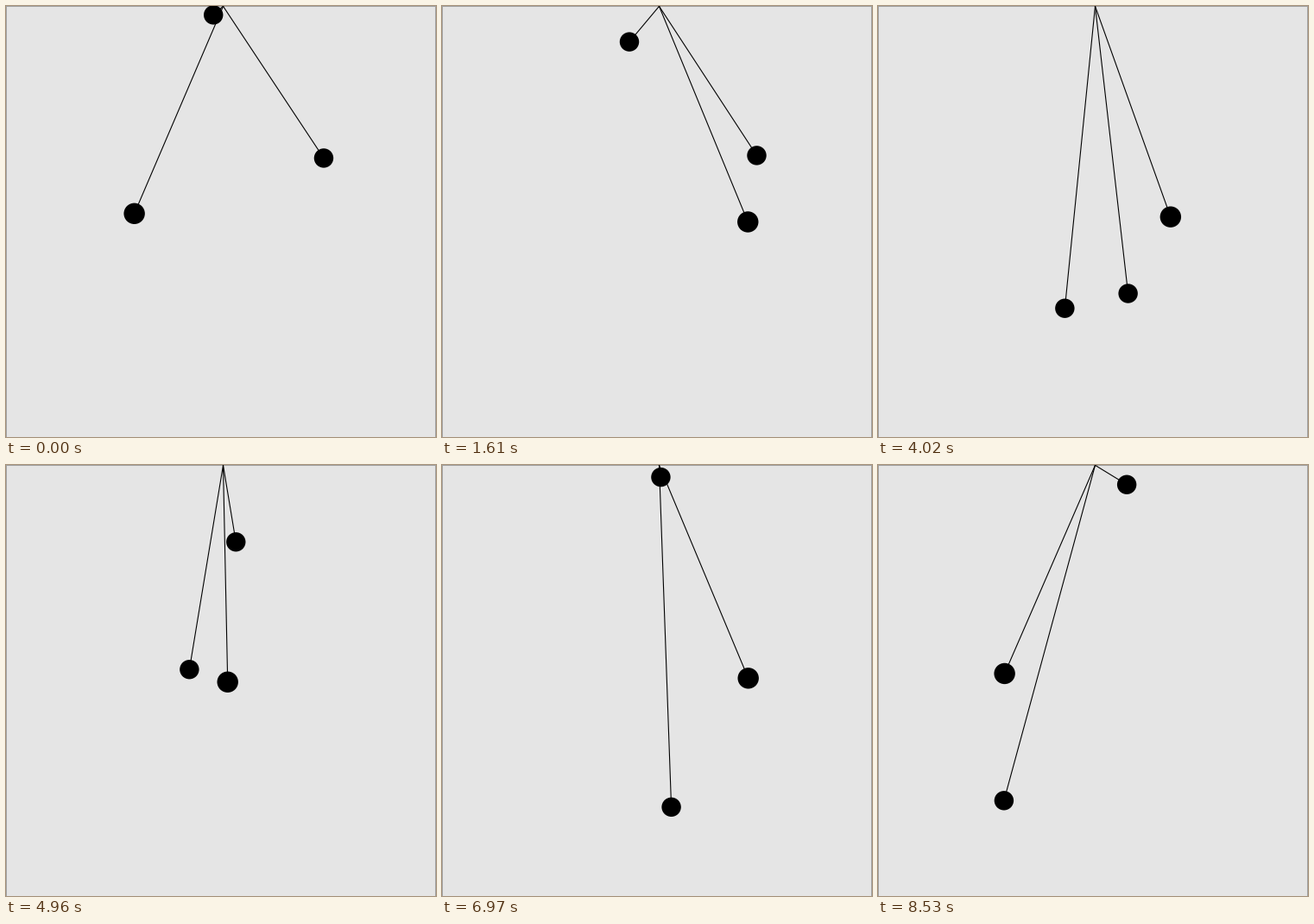
A matplotlib script that plays this animation: 498x500 px, repeating every 8630 ms.

```python
import numpy as np
import matplotlib.pyplot as plt
from matplotlib.animation import FuncAnimation
from matplotlib.lines import Line2D
from matplotlib.patches import Circle, Rectangle
from matplotlib.transforms import Affine2D

W, H, DPI = 498, 500, 64
PX = 72 / DPI
LOOP, TICK, REST = 8630, 10, 100
CENTER = np.array([251.4, 250])
PIVOT = (251.5, 0.3)


class Bob:
    """A ball on a line, swinging as one cosine per axis (degrees, seconds)."""

    def __init__(self, radius, amp, speed, phase):
        self.amp, self.speed, self.phase = map(np.array, (amp, speed, phase))
        self.rod = add(Line2D([], [], color="black", lw=1.1 * PX))
        self.ball = add(Circle((0, 0), radius, fc="black", lw=0))

    def move(self, t):
        angle = np.radians(self.speed * t + self.phase)
        x, y = CENTER + self.amp * np.cos(angle)
        self.rod.set_data([PIVOT[0], x], [PIVOT[1], y])
        self.ball.center = x, y


def add(artist):
    artist.set_transform(to_px)
    return fig.add_artist(artist)


fig = plt.figure(figsize=(W / DPI, H / DPI), dpi=DPI, facecolor="#e5e5e5")
to_px = Affine2D().scale(1, -1).translate(0, H)

# Hairline border, open at the bottom.
for x, y, w, h in [(0, 0, W, 1), (0, 0, 1, H), (W - 1, 0, 1, H)]:
    add(Rectangle((x, y), w, h, fc="#a0a0a0", lw=0, antialiased=False))

bobs = [
    Bob(12.2, amp=(106, 9.2), speed=(129.3, 165.3), phase=(165.8, -179)),
    Bob(11.2, amp=(37, 242), speed=(282, 209.6), phase=(107.6, 172)),
    Bob(11.2, amp=(128, 148), speed=(191.1, 222.75), phase=(24.4, -119.8)),
]


def draw(i):
    # The swing rests briefly before the loop starts over.
    t = min(i * TICK, LOOP - REST) / 1000
    for bob in bobs:
        bob.move(t)


anim = FuncAnimation(fig, draw, frames=LOOP // TICK, interval=TICK,
                     init_func=lambda: None, repeat=True, repeat_delay=0,
                     cache_frame_data=False)
plt.show()
```
